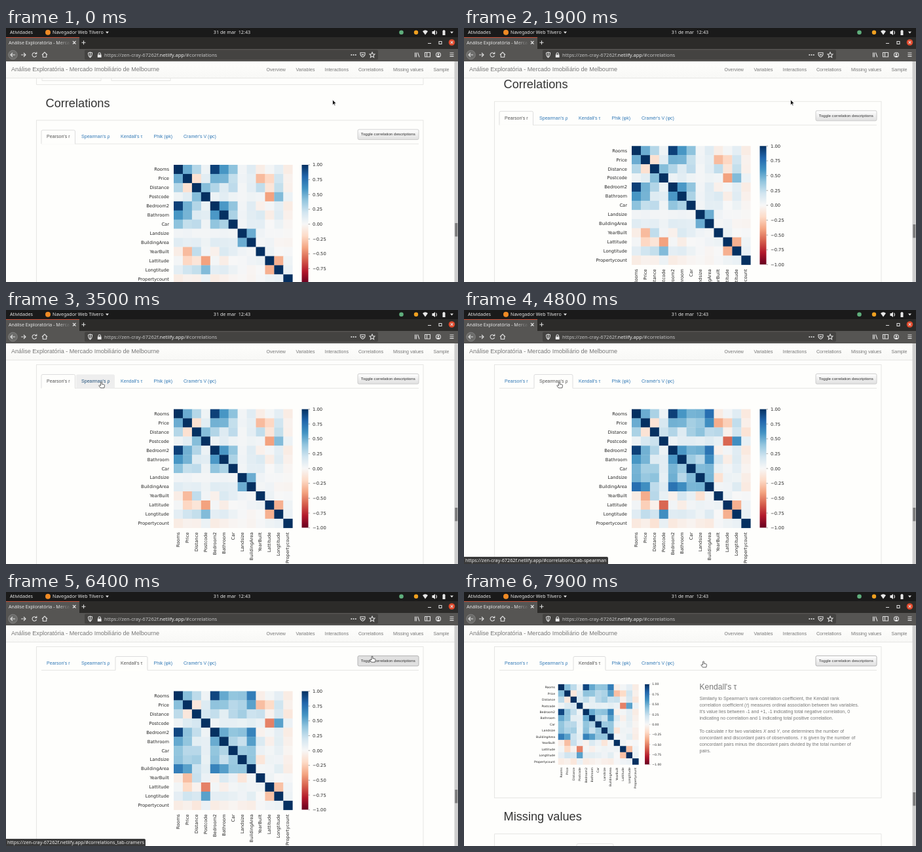
An HTML page that plays this animation: 690x388 px, repeating every 8 s.

```html
<!DOCTYPE html>
<html lang="pt">
<head>
<meta charset="utf-8">
<title>Correlations</title>
<style>
html, body { margin: 0; width: 100%; height: 100%; overflow: hidden; background: #fff; }
svg { position: absolute; left: 0; top: 0; }
text { white-space: pre; }
.page { font: 7.07px "Liberation Sans", Arial, sans-serif; }
.chart { font: 6.75px "DejaVu Sans", sans-serif; fill: #262626; }
.ui { font: 7.2px "Noto Sans", sans-serif; fill: #e8e8e8; }
.h1 { font-size: 18.2px; fill: #333; }
.line { fill: none; stroke: #e6e6e4; }
.icon { fill: none; stroke: #dedede; stroke-width: 1.1; }
#status { position: absolute; left: 0; top: 377px; height: 11px; padding: 0 2px; background: #3a3a3a;
  color: #f0f0f0; font: 7.25px/10px "Noto Sans", sans-serif; white-space: pre; border-radius: 0 2px 0 0; }
</style>
</head>
<body>
<svg width="690" height="388" viewBox="0 0 690 388">
  <defs>
    <linearGradient id="bar" x2="0" y2="1"></linearGradient>
    <linearGradient id="btn" x2="0" y2="1"><stop stop-color="#fff"/><stop offset="1" stop-color="#e0e0e0"/></linearGradient>
    <linearGradient id="navbar" x2="0" y2="1"><stop stop-color="#fefefc"/><stop offset="1" stop-color="#f8f8f6"/></linearGradient>
    <linearGradient id="fade"><stop offset=".8" stop-color="#565553" stop-opacity="0"/><stop offset="1" stop-color="#565553"/></linearGradient>
  </defs>
  <rect width="690" height="388" fill="#fefefc"/>

  <g class="page" id="page">
    <path class="line" d="M46.5 0V29H637V0M55 0V23H145V0M161 0V23H251V0"/>
    <text class="h1" x="60.5" y="63.5">Correlations</text>
    <rect class="line" id="card" x="46.5" y="83.5" width="590.5" height="400"/>
    <path class="line" d="M54 119.5H630"/>
    <g id="tabs"></g>
    <rect id="toggle" x="537" y="97.500" width="93" height="15.500" rx="2" fill="url(#btn)" stroke="#c4c4c4" stroke-width=".8"/>
    <text x="583.3" y="106.900" text-anchor="middle" font-size="6.15" fill="#333">Toggle correlation descriptions</text>
    <g class="chart" id="chart">
      <g id="cells"></g>
      <rect x="451.5" y="151.5" width="10" height="181" fill="url(#bar)"/>
      <g id="labels"></g>
    </g>
    <g id="info" fill="#777">
      <text x="359.5" y="149" font-size="12.1">Kendall's τ</text>
      <g id="lines"></g>
      <text class="h1" x="60.5" y="349">Missing values</text>
      <path class="line" d="M46.5 390V369.5H637V390M172 390V386.5Q172 384.5 174 384.5H226Q228 384.5 228 386.5V390"/>
    </g>
  </g>

  <g class="page" fill="#777">
    <rect y="51" width="685" height="25.5" fill="url(#navbar)"/>
    <path class="line" d="M0 76.5H685"/>
    <text x="8" y="66.3" font-size="9.09">Análise Exploratória - Mercado Imobiliário de Melbourne</text>
    <g id="nav"></g>
  </g>
  <rect x="684.5" y="51" width="5.5" height="337" fill="#cecece"/>
  <rect id="thumb" x="685.3" width="4" height="20.5" fill="#7c7c7c"/>

  <g class="ui">
    <rect width="690" height="14" fill="#1a1a1a"/>
    <text x="6" y="9.4">Atividades</text>
    <circle cx="64" cy="6.7" r="4" fill="#f08a24"/>
    <text x="71" y="9.4" font-size="7.1">Navegador Web Tilvero</text>
    <text x="345" y="9.4" text-anchor="middle">31 de mar  12:43</text>
    <circle cx="603.5" cy="6.7" r="3.3" fill="#5fae7c"/>
    <circle cx="626" cy="6.7" r="3.2" fill="#f0a020"/>
    <path d="M152 5.5h5l-2.5 3zM678 5.5h5l-2.5 3zM636 5q4-3.5 8 0l-4 5.5zM650.500 5h2l2.500-2v8l-2.500-2h-2zM666.500 4h1v-1h2v1h1v7h-4z"/>
    <path class="icon" d="M656.500 4.500q2 2.500 0 5"/>

    <rect y="14" width="690" height="18" fill="#2c2b29"/>
    <rect y="14" width="112" height="18" fill="#565553"/>
    <rect y="14" width="112" height="1" fill="#c8523a"/>
    <text x="4" y="25" font-size="7.1">Análise Exploratória - Merca</text>
    <rect y="16" width="99" height="14" fill="url(#fade)"/>
    <path class="icon" d="M102 20l4.500 4.500m0-4.500l-4.500 4.500M115.500 22.300h6m-3-3v6M644 23.500h5M661 24.500v-4h4v4z"/>
    <circle cx="680.500" cy="22" r="4.800" fill="#e0492c"/>
    <path class="icon" d="M678.700 20.200l3.600 3.600m0-3.600l-3.600 3.600"/>

    <rect y="32" width="690" height="19" fill="#565553"/>
    <circle cx="10.500" cy="41" r="6.800" fill="#6c6c6a" stroke="#959595" stroke-width=".6"/>
    <path class="icon" d="M14 41h-7m3-3l-3 3l3 3M23 41h7m-3-3l3 3l-3 3M46 39a3.300 3.300 0 1 0 .500 3M46.800 36.800v2.700h-2.700M55 41l4-4l4 4M56.300 40.500v4h5.400v-4"/>
    <rect x="120" y="33.500" width="448" height="15" rx="2" fill="#444341"/>
    <path class="icon" d="M125.500 38l3-1l3 1q0 5-3 7q-3-2-3-7M128.500 37v7.500M141 41v-1.500a1.700 1.700 0 0 1 3.400 0v1.500"/>
    <path d="M139.800 40.700h5.800v4.300h-5.800z"/>
    <text x="150" y="43.700" font-size="7.6" fill="#c4c4c4">https://zen-cray-67262f.<tspan fill="#ececec">netlify.app</tspan>/#correlations</text>
    <path d="M526.500 40.300h1.700v1.700h-1.700zM529.700 40.300h1.700v1.700h-1.700zM532.900 40.300h1.700v1.700h-1.700z"/>
    <path class="icon" d="M541 37.800h7v3q-3.500 7-7 0zM543 40l1.500 1.500l1.500-1.500M559 37l1.200 2.700l2.800.300l-2 2l.600 2.800l-2.600-1.500l-2.600 1.500l.600-2.800l-2-2l2.800-.300zM624.500 37.500v7m2-7v7m2-7l2.500 7M639.500 37.500h8v6.500h-8zM642.500 37.500v6.500M677.500 38h6m-6 2.700h6m-6 2.700h6"/>
    <circle class="icon" cx="660" cy="41" r="3.500"/>
    <path d="M657.500 43.200q2.500-2.500 5 0l-2.500 1.300z"/><circle cx="660" cy="40" r="1.300"/>
  </g>
</svg>
<div id="status"></div>
<svg width="690" height="388" style="pointer-events:none">
  <g id="pointer" stroke-width=".7" stroke-linejoin="round">
    <path id="arrow" d="M0 0V8.200L1.900 6.500L3.200 9.300L4.500 8.700L3.200 6H5.700z" fill="#111" stroke="#fff"/>
    <path id="hand" d="M-.900 6V.900Q0-.300 .900 .900V3.800L4.300 4.500Q5.200 4.800 5 6L4.300 9.500H-1.200L-3.600 6.300Q-3.300 5-2 5.500z" fill="#fff" stroke="#222"/>
  </g>
</svg>

<script>
const $ = id => document.getElementById(id);
const add = (parent, tag, attrs, text = '') => {
  const el = document.createElementNS('http://www.w3.org/2000/svg', tag);
  for (const k in attrs) el.setAttribute(k, attrs[k]);
  el.textContent = text;
  return parent.appendChild(el);
};
const set = (el, attrs) => { for (const k in attrs) el.setAttribute(k, attrs[k]); };
const clamp = x => Math.min(1, Math.max(0, x));
const ease = (t, a, b) => { const x = clamp((t - a) / (b - a)); return x * x * (3 - 2 * x); };

// Diverging colour scale, -1 to 1
const scale = '67001f b2182b d6604d f4a582 fddbc7 f7f7f7 d1e5f0 92c5de 4393c3 2166ac 053061'.split(' ')
  .map(h => [0, 2, 4].map(i => parseInt(h.substr(i, 2), 16)));
const colour = v => {
  const p = (v + 1) * 5, i = Math.min(9, Math.floor(p));
  return `rgb(${scale[i].map((c, k) => Math.round(c + (scale[i + 1][k] - c) * (p - i)))})`;
};
scale.forEach((c, i) => add($('bar'), 'stop', { offset: 1 - i / 10, 'stop-color': `rgb(${c})` }));
$('bar').append(...[...$('bar').children].reverse());

// Lower triangles of the correlation matrices, in percent
const pearson = [
  [], [50], [29, -16], [5, 11, 43], [94, 48, 30, 6], [59, 47, 13, 11, 58],
  [41, 24, 26, 5, 40, 32], [3, 4, 2, 2, 3, 4, 3], [12, 9, 10, 5, 12, 11, 10, 50],
  [-7, -32, 25, 3, -5, 15, 10, 4, 2], [2, -21, -13, -41, 2, -7, 0, 1, 4, 6],
  [10, 20, 24, 44, 10, 12, 6, 1, -2, 0, -36], [-8, -4, -5, 6, -8, -5, -2, -1, -3, 1, 5, 7]
];
const spearman = pearson.map(row => [...row]);
spearman[2] = [32, -14];
spearman[3] = [6, 17, 22];
spearman[6] = [47, 34, 34, 11, 47, 37];
spearman[7] = [48, 38, 41, 9, 49, 28, 44];
spearman[8] = [76, 62, 26, 13, 74, 63, 46, 47];
spearman[9].splice(0, 9, -8, -37, 28, 8, -5, 18, 8, -15, 3);
spearman[10].splice(0, 9, 3, -24, -5, -58, 3, -7, 3, 6, 4);
spearman[11].splice(0, 9, 12, 25, 20, 62, 12, 13, 10, 5, 13);
spearman[12].splice(0, 9, -10, -6, -14, 8, -10, -6, -3, -7, -9);
// Kendall's coefficient is weaker than Spearman's except near ±1
const kendall = spearman.map(row => row.map(v => v * (.8 + .2 * (v / 100) ** 2)));
const matrices = [pearson, spearman, kendall];

const names = ['Rooms', 'Price', 'Distance', 'Postcode', 'Bedroom2', 'Bathroom', 'Car', 'Landsize',
  'BuildingArea', 'YearBuilt', 'Lattitude', 'Longtitude', 'Propertycount'];
const size = 181.3 / 13, cells = [];
names.forEach((name, r) => {
  const mid = (r + .5) * size;
  add($('labels'), 'text', { x: 249, y: 151.5 + mid + 2.4, 'text-anchor': 'end' }, name);
  add($('labels'), 'text', { transform: `translate(${256 + mid + 2} 339.5) rotate(-90)`, 'text-anchor': 'end' }, name);
  // Slight overlap hides the seams between cells
  names.forEach((_, c) => cells.push(add($('cells'), 'rect',
    { x: 256 + c * size, y: 151.5 + r * size, width: size + .3, height: size + .3 })));
});
for (let i = 0; i < 9; i++) {
  const v = 1 - i / 4, y = 151.5 + i * 22.66;
  add($('labels'), 'path', { d: `M461.500 ${y}h2.500`, stroke: '#555', 'stroke-width': .5 });
  add($('labels'), 'text', { x: 468, y: y + 2.4 }, v.toFixed(2).replace('-', '−'));
}
let shown = -1;
const showMatrix = n => {
  if (n === shown) return;
  shown = n;
  cells.forEach((cell, i) => {
    const r = Math.floor(i / 13), c = i % 13;
    set(cell, { fill: colour(r === c ? 1 : matrices[n][Math.max(r, c)][Math.min(r, c)] / 100) });
  });
};

const tabs = [['Pearson\'s r', 54, 105.5], ['Spearman\'s ρ', 107, 166], ['Kendall\'s τ', 167, 216],
  ['Phik (φk)', 217.5, 262], ['Cramér\'s V (φc)', 263, 329]].map(([label, x, end]) => ({
  x, end,
  box: add($('tabs'), 'path', { d: `M${x} 119.500V100.500Q${x} 98.500 ${x + 2} 98.500H${end - 2}Q${end} 98.500 ${end} 100.500V119.500` }),
  base: add($('tabs'), 'path', { d: `M${x + .5} 119.500H${end - .5}`, stroke: '#fefefc', 'stroke-width': 1.4 }),
  text: add($('tabs'), 'text', { x: x + 8, y: 110.8 }, label)
}));

[['Overview', 397.5], ['Variables', 442.5], ['Interactions', 486.5], ['Correlations', 538],
  ['Missing values', 591], ['Sample', 652.5]].forEach(([s, x]) => add($('nav'), 'text', { x, y: 65.6 }, s));

['Similarly to Spearman\'s rank correlation coefficient, the Kendall rank',
  'correlation coefficient (τ) measures ordinal association between two variables.',
  'It\'s value lies between -1 and +1, -1 indicating total negative correlation, 0',
  'indicating no correlation and 1 indicating total positive correlation.', '',
  'To calculate τ for two variables X and Y, one determines the number of',
  'concordant and discordant pairs of observations. τ is given by the number of',
  'concordant pairs minus the discordant pairs divided by the total number of',
  'pairs.'].forEach((s, i) => {
  const line = add($('lines'), 'text', { x: 359.5, y: 164.5 + i * 10.1 });
  s.split(/(\b[XY]\b|τ)/).forEach(part =>
    add(line, 'tspan', /^[XYτ]$/.test(part) ? { 'font-style': 'italic' } : {}, part));
});

// Time, x and y of the pointer tip
const path = [[2750, 498.5, 109.5], [3350, 145.5, 109.5], [5050, 145.5, 109.5], [5300, 176.5, 109.5],
  [5850, 176.5, 109.5], [6350, 559, 97.7], [7200, 559, 97.7], [7900, 365.5, 105.5]];
const pointerAt = t => {
  const i = path.findIndex(p => p[0] > t);
  if (i === 0) return path[0].slice(1);
  if (i < 0) return path[path.length - 1].slice(1);
  const [a, b] = [path[i - 1], path[i]], k = ease(t, a[0], b[0]);
  return [1, 2].map(n => a[n] + (b[n] - a[n]) * k);
};
const link = t => t < 3650 ? '' : t < 5400 ? 'spearman' : t < 6050 ? 'kendall' : t < 6700 ? 'cramers' : '';

const clicks = [3650, 5500], opened = 6800, step = 28.75;
function draw(t) {
  const scrolled = ease(t, 1150, 1450) + ease(t, 1950, 2350);
  const open = t >= opened;
  set($('page'), { transform: `translate(0 ${step * (2 - scrolled)})` });
  set($('thumb'), { y: 298 + scrolled * 2 + (open ? 4 : 0) });

  const active = clicks.filter(c => t >= c).length;
  const age = active ? t - clicks[active - 1] : 1e4;
  showMatrix(age < 150 ? active - 1 : active);
  set($('chart'), {
    opacity: age < 150 ? 1 - age / 150 : clamp((age - 150) / 150),
    transform: open ? 'translate(-29.600 38.300) scale(.677)' : ''
  });
  set($('card'), { height: open ? 231 : 400 });
  $('info').style.display = open ? '' : 'none';

  const [x, y] = pointerAt(t);
  tabs.forEach((tab, i) => {
    const on = i === active, hover = t > 2750 && y > 98 && x > tab.x && x < tab.end;
    set(tab.box, { fill: on ? '#fefefc' : hover ? '#eee' : 'none', stroke: on ? '#ddd' : 'none' });
    set(tab.base, { opacity: on ? 1 : 0 });
    set(tab.text, { fill: on ? '#555' : hover ? '#23527c' : '#337ab7' });
  });
  const pressed = x > 537 && t > 6000;
  set($('toggle'), { fill: pressed ? '#e0e0e0' : 'url(#btn)', stroke: pressed || open ? '#a8a8a8' : '#c4c4c4' });

  set($('pointer'), { transform: `translate(${x} ${y})` });
  const hand = t > 3100;
  $('hand').style.display = hand ? '' : 'none';
  $('arrow').style.display = hand ? 'none' : '';

  const target = link(t);
  $('status').style.display = target ? '' : 'none';
  $('status').textContent = 'https://zen-cray-67262f.netlify.app/#correlations_tab-' + target;
}

const start = performance.now();
(function loop() {
  draw((performance.now() - start) % 8000);
  requestAnimationFrame(loop);
})();
</script>
</body>
</html>
```
